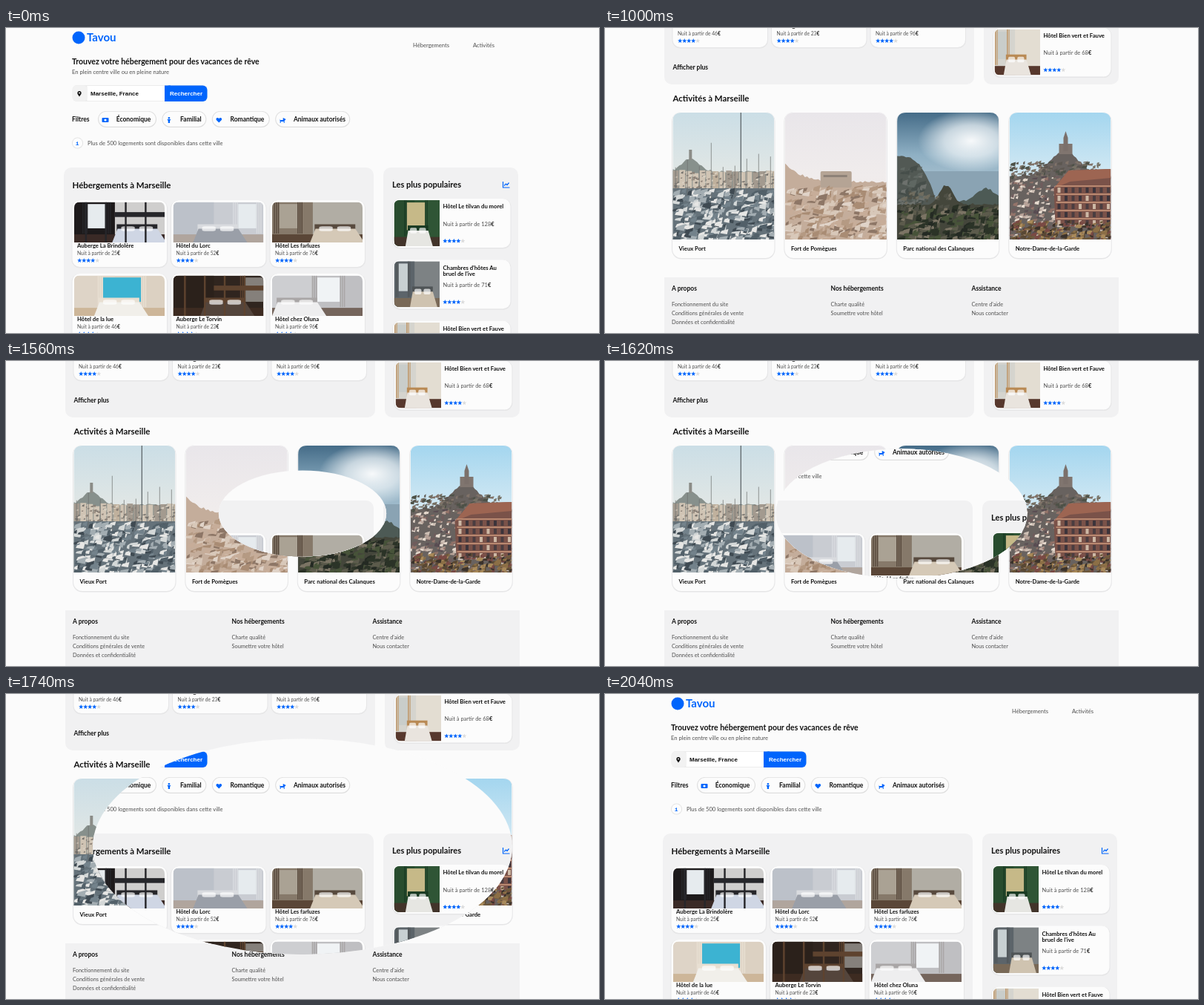
Recreate the animation shown at these times as an HTML page. Size 800 by 411 pixels, loop 2.1 s.

```html
<!DOCTYPE html>
<html lang="fr">
<head>
<meta charset="utf-8">
<style>
  html, body { margin: 0; width: 100%; height: 100%; overflow: hidden; background: #fbfbfb; }
  svg { display: block; width: 100vw; height: 100vh; }
  text { font: 7.6px Lato, "Open Sans", sans-serif; fill: #505050; }
  .b, .title, .h2, .h3, .pill, .name { font-weight: 700; fill: #111; }
  .title { font-size: 10.5px; }
  .h2 { font-size: 11.45px; }
  .h3 { font-size: 11.1px; }
  .pill { font-size: 8.5px; }
  .name { font-size: 7.7px; }
  .price { font-size: 6.7px; }
  .price2 { font-size: 7.5px; }
  .link { font-size: 7.35px; }
  .field, .button { font: 700 8px "Liberation Sans", Arial, sans-serif; fill: #111; }
  .button { fill: #fff; }
  .brand { font-size: 15px; font-weight: 700; fill: #0065fc; }
  .info { font: 700 8px "Liberation Mono", monospace; fill: #0065fc; }
</style>
</head>
<body>
<svg id="stage" viewBox="0 0 800 411"></svg>
<script>
const BLUE = '#0065fc', PAPER = '#fbfbfb', PANEL = '#f1f1f2';

let seed = 7;
const random = () => (seed = (seed * 16807) % 2147483647) / 2147483647;
const pick = list => list[Math.floor(random() * list.length)];
const many = (n, draw) => Array.from({ length: n }, (_, i) => draw(i)).join('');

// Drawing helpers, all returning SVG markup
const box = (x, y, w, h, fill, r = 0) =>
  `<rect x="${x}" y="${y}" width="${w}" height="${h}" rx="${r}" fill="${fill}"/>`;
const poly = (points, fill) => `<polygon points="${points}" fill="${fill}"/>`;
const path = (d, fill = BLUE) => `<path d="${d}" fill="${fill}"/>`;
const stroke = (d, color, width = 1) =>
  `<path d="${d}" fill="none" stroke="${color}" stroke-width="${width}"/>`;
const dot = (x, y, r, fill) => `<circle cx="${x}" cy="${y}" r="${r}" fill="${fill}"/>`;
const text = (x, y, content, style = '') => `<text x="${x}" y="${y}" class="${style}">${content}</text>`;
const at = (x, y, content) => `<g transform="translate(${x} ${y})">${content}</g>`;
const stops = colors => colors.map((c, i) =>
  `<stop offset="${i / (colors.length - 1)}" stop-color="${c}"/>`).join('');
const gradient = (id, ...colors) => `<linearGradient id="${id}" x2="0" y2="1">${stops(colors)}</linearGradient>`;
const card = (x, y, w, h, r = 10) =>
  box(x - 1, y, w + 2, h + 1.5, '#e6e6e7', r + 1) + box(x, y, w, h, '#fcfcfc', r);
const photo = (x, y, shape, picture) => at(x, y, `<g clip-path="url(#${shape})">${picture}</g>`);
const stars = (x, y) => many(5, i =>
  `<use href="#star" x="${x + 6 * i}" y="${y}" fill="${i < 4 ? BLUE : '#dcdcdc'}"/>`);
const price = (x, y, amount, style) =>
  text(x, y, `Nuit à partir de ${amount}<tspan class="b">€</tspan>`, style);

// A bedroom on a unit square: two wall tones, a lit pane with curtains, a bed, optionally bunk frames
function room({ left, right, floor, bed, accent, pane = '#e6ebee', paneAt, paneWidth = .2, bedAt, bunks }) {
  const curtain = x => many(3, i => box(x + i * .022, 0, .012, .78, accent));
  return box(0, 0, 1, 1, right) + box(0, 0, .45, 1, left) + box(0, .8, 1, .2, floor) +
    box(paneAt, .05, paneWidth, .6, pane) + curtain(paneAt - .06) + curtain(paneAt + paneWidth) +
    box(bedAt + .05, .55, .45, .2, accent) +
    poly(`${bedAt + .06},.66 ${bedAt + .5},.66 ${bedAt + .6},1 ${bedAt},1`, bed) +
    many(2, i => box(bedAt + .1 + i * .2, .6, .15, .12, '#ffffffb0', .03)) +
    (bunks ? many(4, i => box(.12 + i * .22, 0, .02, 1, accent)) + box(.45, .25, .55, .12, accent) : '');
}

// Landscapes are 137 by 171: a sky, ridges given by formulas, and seeded facets
const W = 137, H = 171;
const sky = id => box(0, 0, W, H, `url(#${id})`);
const peak = (x, center, width) => Math.exp(-(((x - center) / width) ** 2));
const ridge = (height, fill) => path(`M0 ${H}` +
  many(47, i => `L${i * 3} ${height(i * 3) + random() * 3}`) + `V${H}Z`, fill);
const scatter = (n, top, size, colors, w = W, bottom = H) => many(n, () => {
  const x = random() * w, y = top + random() * (bottom - top);
  const a = size * (.4 + random()), b = size * (.3 + random() * .5);
  return poly(`${x},${y} ${x + a},${y - b / 2} ${x + a * .8},${y + b} ${x - a * .2},${y + b * .7}`, pick(colors));
});

const harbour = sky('harbourSky') + ridge(x => 78 - 18 * peak(x, 24, 16), '#87908c') +
  box(22, 50, 4, 14, '#8b8c87') +
  many(16, i => box(i * 9, 77 + random() * 5, 8, 27, pick(['#c0b19d', '#d0c4b4', '#a39a8f']))) +
  scatter(130, 80, 3, ['#77736e', '#8d8278', '#d8cfc1'], W, 102) + box(0, 102, W, 69, '#65727a') +
  many(9, i => stroke(`M${4 + i * 16} ${30 + random() * 45}V118`, '#6c706f', .7)) + stroke('M92 0V120', '#565e61', 1.2) +
  scatter(330, 104, 8, ['#d4d8d8', '#a3adb2', '#3f4a52', '#73828b', '#e6e6e4', '#526069']);

const fort = sky('fortSky') + ridge(x => 92 - 26 * Math.exp(-x / 22), '#c4ad9b') +
  box(48, 79, 42, 22, '#b5a495', 2) + box(52, 84, 32, 3, '#8e8278') +
  scatter(320, 100, 9, ['#d8c8b9', '#b59a83', '#c7ad99', '#8d7666', '#e0d3c8', '#a98c74']);

const cove = sky('coveSky') + `<ellipse cx="100" cy="38" rx="72" ry="42" fill="url(#glow)"/>` +
  box(0, 79, W, 60, '#8aa3b3') + ridge(x => 118 - 17 * peak(x, 120, 18), '#4d5a55') +
  ridge(x => 58 + 70 * (x / 55) ** 3, '#525954') + scatter(60, 72, 7, ['#6d716d', '#464e4a', '#5f6762'], 32, 130) +
  ridge(x => 122 - 26 * peak(x, 66, 12), '#44463b') +
  scatter(260, 125, 8, ['#2b3327', '#5c5b4c', '#475339', '#7b7464', '#242a23']) +
  scatter(30, 106, 6, ['#6f6c5f', '#4f5046'], 74, 130);

const basilica = sky('citySky') + ridge(x => 84 - 34 * peak(x, 74, 28), '#68625f') +
  box(67, 42, 18, 14, '#80756f') + poly('76,25 79,34 79,52 73,52 73,34', '#7b706b') +
  scatter(120, 66, 5, ['#4d5147', '#817369', '#777165', '#5d5751'], 120, 88) +
  scatter(380, 86, 5, ['#b8a399', '#cdbfb4', '#6f5c5c', '#94746a', '#e6dace', '#594c52']) +
  poly('60,102 80,78 137,76 137,150 62,150', '#7a5249') + poly('60,102 80,78 137,76 137,88 82,93', '#9d6552') +
  many(5, row => box(63, 98 + row * 11, 74, 2, '#b98870') +
    many(8, i => box(65 + i * 9.5, 101 + row * 11, 4, 7, pick(['#3c343b', '#4a3d40', '#cdb8a5'])))) +
  scatter(220, 146, 6, ['#594834', '#8c6f46', '#6e593c', '#3b322b', '#a98a5a', '#7a4a44']);

const stays = [
  ['Auberge La Brindolère', 25, { left: '#1d1a1b', right: '#cfcecd', floor: '#3a2a26', bed: '#cfd6e4',
    accent: '#26262a', paneAt: .15, bedAt: .42, bunks: true }],
  ['Hôtel du Lorc', 52, { left: '#bcc1c9', right: '#c9ccd2', floor: '#b0a59d', bed: '#9a9fa8',
    accent: '#d9dbdf', paneAt: .72, bedAt: .22 }],
  ['Hôtel Les farluzes', 76, { left: '#86796a', right: '#b1ada4', floor: '#5a4637', bed: '#d5c9b7',
    accent: '#584a3e', pane: '#aaa294', paneAt: .08, bedAt: .42 }],
  ['Hôtel de la lue', 46, { left: '#ded4c7', right: '#dcd1c2', floor: '#cdb699', bed: '#f1efea',
    accent: '#e8dfd2', pane: '#3cb3d2', paneAt: .32, paneWidth: .42, bedAt: .22 }],
  ['Auberge Le Torvin', 23, { left: '#2b211b', right: '#30251f', floor: '#3d2b21', bed: '#54453c',
    accent: '#5e432f', pane: '#85807b', paneAt: .8, bedAt: .3, bunks: true }],
  ['Hôtel chez Oluna', 96, { left: '#cdced1', right: '#bfbfc2', floor: '#75655c', bed: '#eeeeef',
    accent: '#a9a6a6', pane: '#f0f3f5', paneAt: .5, paneWidth: .25, bedAt: 0 }]
];
const popular = [
  [['Hôtel Le tilvan du morel'], 128, { left: '#284c2e', right: '#2f5535', floor: '#42342a', bed: '#e6e6e2',
    accent: '#193a22', pane: '#c6b988', paneAt: .28, paneWidth: .4, bedAt: .25 }],
  [["Chambres d'hôtes Au", "bruel de l'ive"], 71, { left: '#5c646a', right: '#7d8284', floor: '#796957', bed: '#cfc3b0',
    accent: '#4f5456', pane: '#c8d0d2', paneAt: .1, bedAt: .35 }],
  [['Hôtel Bien vert et Fauve'], 68, { left: '#d5d4ce', right: '#e3ddd2', floor: '#57382d', bed: '#e9e4de',
    accent: '#b98a55', pane: '#c9cdca', paneAt: .07, bedAt: .2 }]
];
const activities = [
  ['Vieux Port', harbour], ['Fort de Pomègues', fort],
  ['Parc national des Calanques', cove], ['Notre-Dame-de-la-Garde', basilica]
];
const filters = [
  ['Économique', 79, box(-4, -3, 9, 6, BLUE, 1) + dot(.5, 0, 1.6, '#fff')],
  ['Familial', 60, dot(0, -2.8, 1.3, BLUE) + path('M-2.5-1H2.5L1.2 1V4H-1.2V1Z')],
  ['Romantique', 78, path('M0 3.5L-3.5 0C-5-3-1-4 0-1.5C1-4 5-3 3.5 0Z')],
  ['Animaux autorisés', 101, path('M-4-2L-3 0H1V-3L5-1L3 1V4H2V2H-2V4H-3V1Z')]
];

let pillX = 124;
const pills = filters.map(([label, width, icon]) => {
  const pill = box(0, 112, width, 22, '#dedede', 11) + box(1, 112.8, width - 2, 20, '#fcfcfc', 10) +
    at(9.5, 124, icon) + text(24.7, 126, label, 'pill');
  const placed = at(pillX, 0, pill);
  pillX += width + 7.4;
  return placed;
}).join('');

const header = dot(98, 13, 8.5, BLUE) + text(109, 18, 'Tavou', 'brand') +
  text(549, 26, 'Hébergements') + text(630, 26, 'Activités') +
  text(89, 49.3, 'Trouvez votre hébergement pour des vacances de rêve', 'title') +
  text(89, 62.3, 'En plein centre ville ou en pleine nature') +
  box(89.5, 77, 182, 22, '#ececec', 6) + box(109.5, 78, 105, 20, '#fff') + box(90, 77.5, 20, 21, '#f2f2f2', 5) +
  box(214, 77.5, 57.5, 21.5, BLUE, 6) + box(214, 77.5, 8, 21.5, BLUE) +
  path('M99 92.5L96.6 89C95 83.5 103 83.5 101.4 89Z', '#111') + dot(99, 87.5, 1, '#eee') +
  text(114, 91, 'Marseille, France', 'field') + text(221, 91, 'Rechercher', 'button') +
  text(89, 126, 'Filtres', 'pill') + pills +
  dot(96.5, 155, 7.5, '#dedede') + dot(96.5, 155, 6.7, '#fdfdfd') + text(93.7, 157.7, 'i', 'info') +
  text(110, 157.5, 'Plus de 500 logements sont disponibles dans cette ville');

const scaled = (w, h, content) => `<g transform="scale(${w} ${h})">${content}</g>`;

const stayGrid = box(78, 188, 418, 283, PANEL, 10) + text(89.5, 216, 'Hébergements à Marseille', 'h2') +
  stays.map(([name, amount, look], i) => at(89.5 + i % 3 * 133.5, 232 + Math.floor(i / 3) * 99,
    card(0, 0, 127.5, 90) + photo(2.5, 2.5, 'wide', scaled(122, 54.5, room(look))) +
    text(6.5, 64.4, name, 'name') + price(6.5, 74, amount, 'price') + stars(9.7, 81.3))).join('') +
  text(89.5, 450.8, 'Afficher plus', 'pill');

const popularList = box(509, 188, 182, 283, PANEL, 10) + text(521, 215.2, 'Les plus populaires', 'h3') +
  stroke('M670.5 207V215H679.5M672 212.5L674.5 210L676 211.5L678.5 208.5', BLUE, 1.2) +
  popular.map(([lines, amount, look], i) => at(522, 230 + i * 82.3,
    card(0, 0, 158.5, 66) + photo(1.5, 2, 'square', scaled(61.5, 62, room(look))) +
    lines.map((line, row) => text(67.5, 13.3 + row * 8.2, line, 'name')).join('') +
    price(67.5, 36.5, amount, 'price2') + stars(70.3, 57))).join('');

const activityRow = text(89.5, 494, 'Activités à Marseille', 'h2') +
  activities.map(([name, picture], i) => at(89 + i * 151.4, 508,
    card(0, 0, 137.5, 197, 12) + photo(.3, 1, 'tall', picture) + text(8.5, 187.2, name, 'name'))).join('');

const footer = box(78, 731, 613, 100, PANEL) + [
  [88, 'A propos', 'Fonctionnement du site', 'Conditions générales de vente', 'Données et confidentialité'],
  [302.5, 'Nos hébergements', 'Charte qualité', 'Soumettre votre hôtel'],
  [492.5, 'Assistance', "Centre d'aide", 'Nous contacter']
].map(([x, title, ...links]) => text(x, 749, title, 'pill') +
  links.map((link, i) => text(x, 769.5 + i * 12, link, 'link')).join('')).join('');

const starPoints = many(10, i => {
  const r = i % 2 ? 1.4 : 3.2, a = i * Math.PI / 5;
  return `${r * Math.sin(a)},${-r * Math.cos(a)} `;
});

// Photos share the card's rounded top or left corners
const topRounded = (w, h, r) => `M0 ${h}V${r}Q0 0 ${r} 0H${w - r}Q${w} 0 ${w} ${r}V${h}Z`;
const leftRounded = (w, h, r) => `M${w} ${h}H${r}Q0 ${h} 0 ${h - r}V${r}Q0 0 ${r} 0H${w}Z`;
const clip = (id, d) => `<clipPath id="${id}"><path d="${d}"/></clipPath>`;

const stage = document.getElementById('stage');
stage.innerHTML = `<defs>
  ${gradient('harbourSky', '#cbdee6', '#e2e7e5', '#d9dcd8')}
  ${gradient('fortSky', '#e9e6ea', '#f0ecec', '#eee7e3')}
  ${gradient('coveSky', '#456c88', '#8fb0c4', '#b5c9d4', '#718b9b')}
  ${gradient('citySky', '#a4d6ef', '#d4e9f3', '#dce8ed')}
  <radialGradient id="glow">${stops(['#fffffff0', '#f4f8fab0', '#ffffff00'])}</radialGradient>
  ${clip('wide', topRounded(122, 54.5, 8))}
  ${clip('square', leftRounded(61.5, 62, 8))}
  ${clip('tall', topRounded(W, H, 12))}
  <clipPath id="iris"><ellipse id="opening" cx="400" cy="205.5"/></clipPath>
  <polygon id="star" points="${starPoints}"/>
  <g id="page">${header + stayGrid + popularList + activityRow + footer}</g>
</defs>
${box(0, 0, 800, 411, PAPER)}
<use id="view" href="#page"/>
<g id="edges">${box(779, 0, 1, 411, '#ececee')}${box(0, 410, 780, 1, '#c3c4d0')}</g>
<g clip-path="url(#iris)">${box(0, 0, 800, 411, PAPER)}<use href="#page"/></g>`;

const [view, edges, opening] = ['view', 'edges', 'opening'].map(id => document.getElementById(id));
const scrolls = ['translate(0 0)', 'translate(-15.5 -191.3) scale(.9965)', 'translate(2 -395)'];

function draw() {
  const time = performance.now() % 2100;
  const stop = Math.min(2, Math.floor(time / 500));
  // The iris opens in ten equal steps until it encloses the stage corners
  const step = time < 1500 ? 0 : Math.floor((time - 1500) / 60) + 1;
  view.setAttribute('transform', scrolls[stop]);
  edges.setAttribute('visibility', stop === 1 ? 'visible' : 'hidden');
  opening.setAttribute('rx', 400 * Math.SQRT2 * step / 10);
  opening.setAttribute('ry', 205.5 * Math.SQRT2 * step / 10);
  requestAnimationFrame(draw);
}
draw();
</script>
</body>
</html>
```
